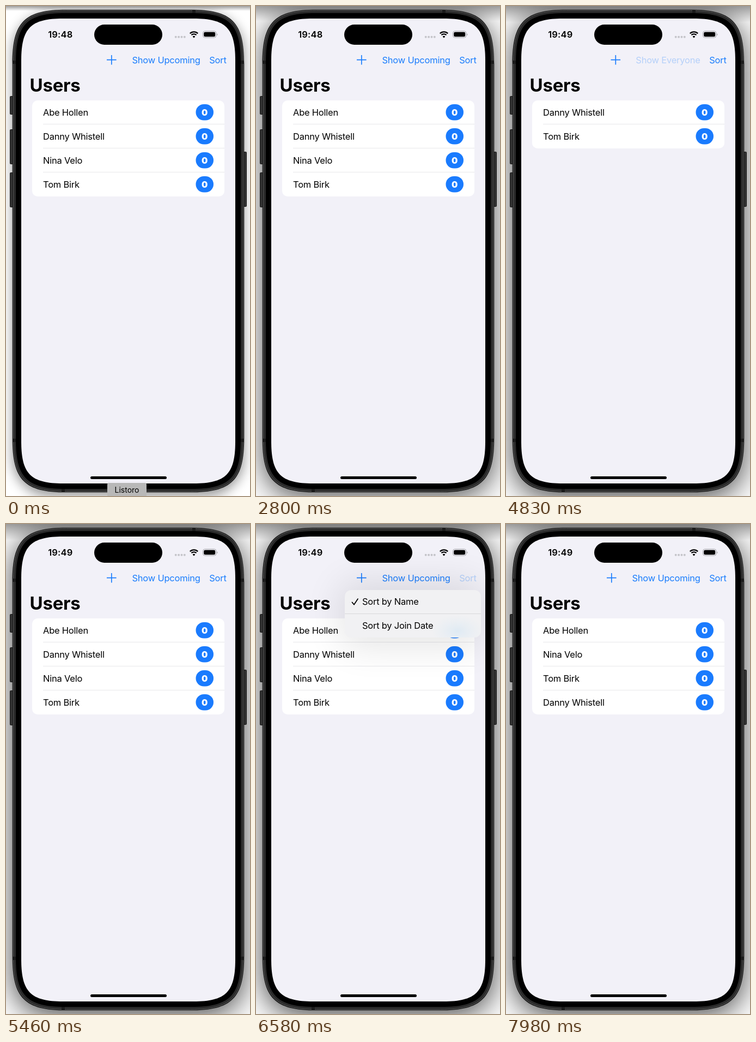
An HTML page that plays this animation: 448 by 898 pixels, repeating every 8 s.

```html
<!DOCTYPE html>
<html lang="en">
<head>
<meta charset="utf-8">
<title>Users list</title>
<style>
  html, body { margin: 0; height: 100%; overflow: hidden; background: #fff; }
  svg { display: block; width: 100vw; height: 100vh; }
  text { font: 16.5px Inter, "Liberation Sans", sans-serif; letter-spacing: -.014em; white-space: pre; }
  .link { fill: #1a7dfd; text-anchor: end; }
  .mid { text-anchor: middle; }
  .clock { font-weight: 600; letter-spacing: .01em; }
  .title { font-size: 33px; font-weight: 700; letter-spacing: -.008em; }
  .count { font-size: 16px; font-weight: 900; fill: #fff; letter-spacing: 0; }
  .tip { font-size: 14px; letter-spacing: 0; }
</style>
</head>
<body>
<svg viewBox="0 0 448 898" preserveAspectRatio="none">
  <defs>
    <filter id="wide" x="-50%" y="-50%" width="200%" height="200%"><feGaussianBlur stdDeviation="27"/></filter>
    <filter id="near" x="-50%" y="-50%" width="200%" height="200%"><feGaussianBlur stdDeviation="11"/></filter>
    <filter id="soft" x="-100%" y="-200%" width="300%" height="500%"><feGaussianBlur stdDeviation="34"/></filter>
    <linearGradient id="shade" x2="0" y2="1">
      <stop stop-opacity=".38"/><stop offset="1" stop-opacity="0"/>
    </linearGradient>
    <radialGradient id="glow">
      <stop stop-color="#7fc4f5" stop-opacity=".16"/><stop offset="1" stop-color="#a9dcf8" stop-opacity="0"/>
    </radialGradient>
    <clipPath id="screen"><path id="glass"/></clipPath>
    <clipPath id="cardClip"><rect id="cardBox" x="48" y="173" width="353" rx="10"/></clipPath>
    <clipPath id="lineClip"><rect id="lineBox" x="48" y="173" width="353"/></clipPath>
    <clipPath id="menuClip"><rect x="163" y="121" width="250" height="87" rx="12"/></clipPath>
  </defs>

  <!-- window shadow -->
  <rect id="idleShadow" x="12" y="14" width="425" height="884" rx="70" filter="url(#near)"/>
  <rect id="focusShadow" x="12" y="17" width="425" height="884" rx="70" filter="url(#wide)"/>
  <rect id="topShade" width="448" fill="url(#shade)"/>

  <!-- phone body -->
  <g fill="#333" stroke="#161616">
    <rect x="7.5" y="165.5" width="7" height="33" rx="1"/>
    <rect x="7.5" y="226.5" width="7" height="63" rx="1"/>
    <rect x="7.5" y="305.5" width="7" height="63" rx="1"/>
    <rect x="434.5" y="267.5" width="7" height="100" rx="1"/>
  </g>
  <path id="edge" fill="#151515"/>
  <path id="band" fill="#2a2a2a" stroke="#5c5c5c"/>
  <path d="M12 103h6M431 103h6M12 796h6M431 796h6M345 7v6M105 885v6" stroke="#1a1a1a" stroke-width="6"/>
  <path id="bezel"/>

  <g clip-path="url(#screen)">
    <rect x="28" y="23" width="393" height="852" fill="#f2f1f8"/>

    <!-- status bar -->
    <text id="clock" class="mid clock" x="99.8" y="58"></text>
    <path d="M311.7 56.7h.01m5.4 0h.01m5.4 0h.01m5.3 0h.01" stroke="#c5c5ca" stroke-width="4" stroke-linecap="round"/>
    <path d="M337.8 50.3a10.5 10.5 0 0 1 14.4 0M340.5 53.2a6.5 6.5 0 0 1 9 0" fill="none" stroke="#000" stroke-width="2.3"/>
    <path d="M345 58.4l-2.4-2.5a3.4 3.4 0 0 1 4.8 0z"/>
    <rect x="361.5" y="46" width="24.5" height="12" rx="3.8" fill="none" stroke="#a5a5aa"/>
    <path d="M387.3 50.2v4a2.2 2.2 0 0 0 0-4z" fill="#a5a5aa"/>
    <rect x="363.2" y="47.7" width="21" height="8.6" rx="2.4"/>

    <!-- navigation bar -->
    <path id="plus" d="M185 98.7h17.6m-8.8-8.8v17.6" stroke="#1a7dfd" stroke-width="1.7"/>
    <text id="filter" class="link" x="356.6" y="105"></text>
    <text id="sort" class="link" x="404.6" y="105">Sort</text>
    <text class="title" x="43.6" y="157">Users</text>

    <!-- list -->
    <g clip-path="url(#cardClip)">
      <rect x="48" y="173" width="353" height="176" fill="#fff"/>
      <g id="rows"></g>
      <path clip-path="url(#lineClip)" d="M68 216.5h333M68 260.5h333M68 304.5h333" stroke="#e7e7ea"/>
    </g>

    <!-- menu -->
    <g id="menu">
      <rect x="155" y="108" width="262" height="116" rx="24" opacity=".105" filter="url(#soft)"/>
      <g clip-path="url(#menuClip)">
        <rect x="163" y="121" width="250" height="87" fill="#f1f1f3"/>
        <rect id="chosen" x="163" y="165" width="250" height="43" fill="#dfdfe1"/>
        <ellipse cx="370" cy="196" rx="48" ry="30" fill="url(#glow)"/>
        <path d="M163 164.5h250" stroke="#d8d8db"/>
      </g>
      <path d="M176.5 143.5l3.5 4.3l7-10.5" fill="none" stroke="#000" stroke-width="1.8" stroke-linecap="round" stroke-linejoin="round"/>
      <text x="195" y="148">Sort by Name</text>
      <text x="195" y="192">Sort by Join Date</text>
    </g>

    <rect x="155" y="862" width="140" height="5" rx="2.5"/>
  </g>
  <rect x="162" y="34" width="125" height="37" rx="18.5"/>

  <g id="tip">
    <rect x="186" y="874" width="72" height="26" rx="3" fill="#b8b8b8"/>
    <text class="mid tip" x="222" y="892">Listoro</text>
  </g>
</svg>
<script>
const LOOP = 8000, STEP = 70, ROW = 44;
const $ = id => document.getElementById(id);
const clamp = v => Math.max(0, Math.min(1, v));
const ramp = (t, start, length) => clamp((t - start) / length);
const ease = p => p * p * (3 - 2 * p);
const set = (id, name, value) => $(id).setAttribute(name, value);

// Rectangle around the screen whose corners bend gradually
function smoothRect(id, grow, radius) {
  const x = 28 - grow, y = 23 - grow, w = 393 + 2 * grow, h = 852 + 2 * grow;
  const e = 1.4 * radius, k = e - .314 * radius, s = w - 2 * e, v = h - 2 * e;
  set(id, 'd', `M${x + e} ${y}h${s}c${k} 0 ${e} ${e - k} ${e} ${e}v${v}
    c0 ${k} ${k - e} ${e} ${-e} ${e}h${-s}c${-k} 0 ${-e} ${k - e} ${-e} ${-e}v${-v}
    c0 ${-k} ${e - k} ${-e} ${e} ${-e}z`);
}
smoothRect('edge', 16.3, 71);
smoothRect('band', 14.6, 69.5);
smoothRect('bezel', 10, 65);
smoothRect('glass', 0, 55);

// Slot by name, slot among the upcoming, slot by join date, kept when filtered
const users = [
  ['Abe Hollen', 0, 0, 0, false],
  ['Danny Whistell', 1, 0, 3, true],
  ['Nina Velo', 2, 1, 1, false],
  ['Tom Birk', 3, 1, 2, true]
];
$('rows').innerHTML = users.map(([name]) => `<g>
  <text x="68" y="201">${name}</text>
  <rect x="348.5" y="180" width="32.5" height="29.6" rx="14.8" fill="#1a7bfe"/>
  <text class="mid count" x="364.8" y="200.8">0</text></g>`).join('');

function drawList(t) {
  const filtered = ease(ramp(t, 3010, 490)) - ease(ramp(t, 4970, 490));
  const resorted = ease(ramp(t, 7630, 350));
  users.forEach(([, byName, upcoming, byDate, kept], i) => {
    const slot = byName + (upcoming - byName) * filtered + (byDate - byName) * resorted;
    const row = $('rows').children[i];
    row.setAttribute('transform', `translate(0 ${slot * ROW})`);
    row.setAttribute('opacity', kept ? 1 : clamp(1 - 1.5 * filtered));
  });
  const height = ROW * (4 - 2 * filtered);
  set('cardBox', 'height', height);
  set('lineBox', 'height', height - 1);
}

function drawBar(t) {
  const upcomingOnly = t >= 3080 && t < 5040;
  $('clock').textContent = t < 3010 ? '19:48' : '19:49';
  $('filter').textContent = upcomingOnly ? 'Show Everyone' : 'Show Upcoming';
  set('plus', 'transform', `translate(${upcomingOnly ? 7.5 : 0} 0)`);
  const press = (down, up) => t < down ? 1 : t < up ? .28 : .28 + .72 * ramp(t, up - STEP, 280);
  set('filter', 'opacity', Math.min(press(3010, 3080), press(4830, 5040)));
  set('sort', 'opacity', press(5950, 7700));
}

function drawMenu(t) {
  const closing = ramp(t, 7630, 350);
  const scale = (1 - Math.exp(-(t - 6050) / 41)) * (1 - .75 * ease(closing));
  const open = t >= 6090 && closing < 1;
  set('menu', 'display', open ? 'inline' : 'none');
  if (!open) return;
  set('menu', 'transform', `translate(413 121) scale(${scale}) translate(-413 -121)`);
  set('menu', 'opacity', ramp(t, 6050, 110) * clamp(1 - 1.25 * closing));
  set('chosen', 'opacity', t >= 7630 ? 1 : 0);
}

function draw(t) {
  const focus = ramp(t, 2170, 700) * (t >= 2800);
  set('idleShadow', 'opacity', .42 * (1 - focus));
  set('focusShadow', 'opacity', .72 * focus);
  set('topShade', 'height', 9 + 21 * focus);
  set('tip', 'opacity', 1 - ramp(t, 210, 280));
  drawBar(t);
  drawList(t);
  drawMenu(t);
}

const begin = performance.now();
function frame(now) {
  const t = Math.max(0, now - begin) % LOOP;
  draw(Math.floor((t + .5) / STEP) * STEP);
  requestAnimationFrame(frame);
}
draw(0);
requestAnimationFrame(frame);
</script>
</body>
</html>
```
